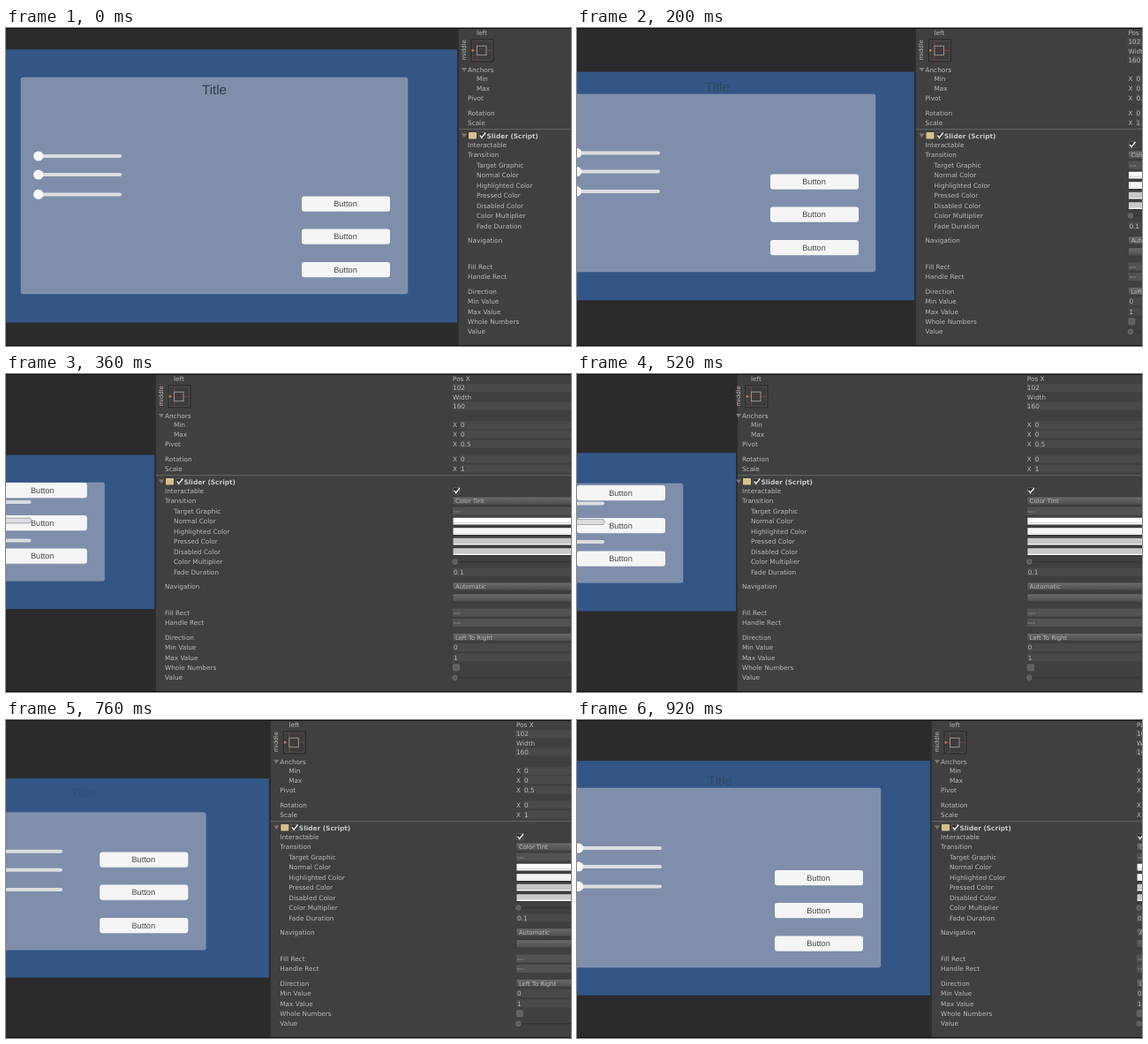
Recreate the animation shown at these times as an HTML page. Size 640 by 360 pixels, loop 0.96 s.

```html
<!DOCTYPE html>
<html lang="en">
<head>
<meta charset="utf-8">
<title>Resizing a layout</title>
<style>
  html, body { margin: 0; width: 100%; height: 100%; overflow: hidden; background: #2b2b2b; }
  svg { display: block; width: 640px; height: 360px; }
  text { text-rendering: geometricPrecision; }
  .ui { font: 7.3px "DejaVu Sans", sans-serif; fill: #b8b8b8; }
  .head { font: bold 7.4px "DejaVu Sans", sans-serif; fill: #c8c8c8; }
  .btn { font: 9.2px "Liberation Sans", Arial, sans-serif; fill: #484848; text-anchor: middle; }
  .title { font: 15px "Liberation Sans", Arial, sans-serif; fill: #333a46; text-anchor: middle; }
</style>
</head>
<body>
<svg id="stage" viewBox="0 0 640 360">
  <defs>
    <linearGradient id="bevel" x2="0" y2="1">
      <stop offset="0" stop-color="#6c6c6c"/>
      <stop offset="1" stop-color="#4c4c4c"/>
    </linearGradient>
  </defs>
</svg>
<script>
const stage = document.getElementById('stage');
const LOOP = 960, STEP = 40;

function add(parent, tag, attrs, text) {
  const el = document.createElementNS('http://www.w3.org/2000/svg', tag);
  set(el, attrs);
  if (text) el.textContent = text;
  parent.appendChild(el);
  return el;
}
function set(el, attrs) {
  for (const k in attrs) el.setAttribute(k, attrs[k]);
}
const move = (el, x, y) => el.setAttribute('transform', `translate(${x} ${y})`);
const rect = (p, x, y, width, height, fill, more) =>
  add(p, 'rect', { x, y, width, height, fill, ...more });
const label = (p, x, y, text, cls = 'ui', more) =>
  add(p, 'text', { x, y: y + 2.6, class: cls, ...more }, text);

// Poses over time, joined by monotone curves
const times = [0, 200, 360, 520, 680, 840, 920];
const poses = {
  edge:    [511, 382, 168, 180, 245, 355, 400],
  labels:  [523, 394.5, 180, 187, 257, 367, 412],
  right:   [455, 338, 111.5, 120, 184, 277, 344],
  top:     [56, 75, 123, 124, 110, 98, 77],
  bottom:  [301, 276, 234.3, 236.3, 250, 271, 280],
  slideX:  [131, 94, 28.5, 31, 48, 82, 96],
  slideY:  [166, 162.5, 166, 167.5, 167.3, 172, 166],
  btnX:    [335, 219, -8.3, 0, 64, 157, 224],
  btnY:    [236, 211, 168.6, 171.5, 184.5, 206.5, 215.5],
  titleX:  [236, 159, 25, 30, 60, 122, 162],
  titleY:  [70, 67, 85, 85, 88, 75, 69],
  titleOn: [1, 0.55, 0, 0, 0, 0.5, 0.5]
};

function curve(v) {
  const n = v.length - 1;
  const d = i => (v[i + 1] - v[i]) / (times[i + 1] - times[i]);
  const slope = v.map((_, i) => {
    if (i === 0) return 0;
    if (i === n) return d(n - 1);
    const a = d(i - 1), b = d(i);
    return a * b > 0 ? 2 * a * b / (a + b) : 0;
  });
  return t => {
    let i = 0;
    while (i < n - 1 && t >= times[i + 1]) i++;
    const h = times[i + 1] - times[i], u = Math.min(1, (t - times[i]) / h), w = 1 - u;
    return v[i] * w * w * (1 + 2 * u) + v[i + 1] * u * u * (1 + 2 * w)
      + h * u * w * (slope[i] * w - slope[i + 1] * u);
  };
}
const at = {};
for (const k in poses) at[k] = curve(poses[k]);

// Scene view
rect(stage, 0, 0, 640, 360, '#2b2b2b');
const blue = rect(stage, -2, 0, 0, 0, '#335686');
const card = rect(stage, 0, 0, 0, 0, '#7f8fab', { rx: 2, stroke: '#8896b0', 'stroke-width': 0.5 });
const title = add(stage, 'text', { class: 'title' }, 'Title');

const buttons = add(stage, 'g', {});
for (const y of [-37, 0, 37.5]) {
  rect(buttons, 0, y - 8.1, 100, 17.2, '#b4bbc8', { rx: 3 });
  rect(buttons, 0, y - 8.6, 100, 17, '#f5f5f6', { rx: 3 });
  add(buttons, 'text', { x: 49.5, y: y + 3.2, class: 'btn' }, 'Button');
}

const sliders = add(stage, 'g', {});
const bars = [-21, 0, 22.4].map(y => {
  const bar = rect(sliders, -94, y - 2, 94, 4, '#dcdde0', { rx: 2 });
  add(sliders, 'circle', { cx: -94.3, cy: y, r: 5.6, fill: '#f8f8f8' });
  return bar;
});

// Inspector
const panel = rect(stage, 0, 0, 640, 360, '#404040');
const rule = rect(stage, 0, 114.2, 640, 1, '#666');
const gap = rect(stage, 0, 0, 2, 360, '#2e2e2e');
const names = add(stage, 'g', {});
const values = add(stage, 'g', {});

function arrow(y) {
  add(names, 'path', { d: `M-7 ${y - 2}h6l-3 4.5z`, fill: '#787878' });
}
function check(p, x, y, on) {
  rect(p, x, y - 3.5, 7, 7, on ? '#303030' : '#606060', { rx: 1, stroke: '#777', 'stroke-width': 0.6 });
  if (on) add(p, 'path', {
    d: `M${x + 1.2} ${y - 0.3}l2 2.6 4.4-5.6`, fill: 'none', stroke: '#f0f0f0', 'stroke-width': 1.4
  });
}

label(names, 16, 5, 'left', 'ui', { 'text-anchor': 'middle' });
add(names, 'text', {
  class: 'ui', 'text-anchor': 'middle', transform: 'translate(-2.4 25) rotate(-90)', style: 'font-size:6.8px'
}, 'middle');
rect(names, 4, 13, 25, 25, '#3c3c3c', { stroke: '#2a2a2a' });
rect(names, 5.5, 14.5, 22, 22, 'none', { stroke: '#525252', 'stroke-width': 0.7 });
add(names, 'path', { d: 'M5 25.5H28M10.5 14V37', stroke: '#80453c', 'stroke-width': 0.8 });
rect(names, 10.5, 20.3, 10.5, 10.4, '#3c3c3c', { stroke: '#a8978f', 'stroke-width': 0.9 });
rect(names, 4.5, 24.2, 2.4, 2.4, '#c87a48');

arrow(47);
arrow(121.5);
rect(names, 1, 118, 9, 7.4, '#d6c08c', { rx: 1 });
check(names, 12.6, 121.8, true);
label(names, 21.5, 122, 'Slider (Script)', 'head');

const rows = [
  [0, 47.3, 'Anchors'], [10, 57.6, 'Min'], [10, 68, 'Max'], [0, 79.3, 'Pivot'],
  [0, 96, 'Rotation'], [0, 107.3, 'Scale'],
  [0, 132.2, 'Interactable'], [0, 143.7, 'Transition'], [10, 155.2, 'Target Graphic'],
  [10, 166.7, 'Normal Color'], [10, 178.2, 'Highlighted Color'], [10, 189.7, 'Pressed Color'],
  [10, 201.2, 'Disabled Color'], [10, 212.5, 'Color Multiplier'], [10, 224, 'Fade Duration'],
  [0, 240.5, 'Navigation'], [0, 270, 'Fill Rect'], [0, 281.5, 'Handle Rect'],
  [0, 298, 'Direction'], [0, 309.5, 'Min Value'], [0, 321, 'Max Value'],
  [0, 332.3, 'Whole Numbers'], [0, 343.8, 'Value']
];
for (const [x, y, s] of rows) label(names, x, y, s);

function field(y, text, x = 0, fill = '#494949') {
  rect(values, x, y - 4.5, 160, 9, fill);
  label(values, x + 1, y, text);
}
function menu(y, text) {
  rect(values, 0, y - 4.6, 160, 9.2, 'url(#bevel)', { rx: 1.5, stroke: '#343434', 'stroke-width': 0.6 });
  if (text) label(values, 3, y, text, 'ui', { style: 'font-size:6.8px' });
}
// Colour above, opacity strip below
function swatch(y, fill) {
  rect(values, 0, y - 4.6, 160, 9.2, '#2e2e2e');
  rect(values, 0.5, y - 4, 160, 6, fill);
  rect(values, 0.5, y + 2, 160, 1.8, '#fff');
}
function knob(y) {
  rect(values, 0, y - 0.7, 160, 1.4, '#353535');
  add(values, 'circle', { cx: 2.5, cy: y, r: 2.8, fill: '#5c5c5c', stroke: '#7c7c7c', 'stroke-width': 0.6 });
}

label(values, 0, 5.5, 'Pos X');
field(15.7, '102', -1);
label(values, 0, 26, 'Width');
field(36, '160', -1);
for (const [y, s] of [[57.6, '0'], [68, '0'], [79.3, '0.5'], [96, '0'], [107.3, '1']]) {
  label(values, 0, y, 'X');
  field(y, s, 8);
}
check(values, 0.5, 132.2, true);
menu(143.7, 'Color Tint');
for (const y of [155.2, 270, 281.5]) field(y, '---', 0, '#525252');
swatch(166.7, '#ffffff');
swatch(178.2, '#f5f5f5');
swatch(189.7, '#c8c8c8');
swatch(201.2, '#c8c8c8');
knob(212.5);
field(224, '0.1');
menu(240.5, 'Automatic');
menu(253.5);
menu(298, 'Left To Right');
field(309.5, '0');
field(321, '1');
check(values, 0.5, 332.3, false);
knob(343.8);

rect(stage, 0, 0, 640, 1, '#111');
rect(stage, 0, 359, 640, 1, '#111');

function draw(ms) {
  let t = Math.floor((ms % LOOP) / STEP) * STEP;
  if (t === 400) t = 360; // short rest at the narrowest pose
  const p = {};
  for (const k in at) p[k] = at[k](t);

  const half = 87.2 + (p.edge - 168) * 0.1965;
  set(blue, { y: 178.9 - half, width: p.edge + 2, height: half * 2 });
  const left = 17 - (511 - p.edge) * 0.29;
  set(card, { x: left, y: p.top, width: p.right - left, height: p.bottom - p.top });
  set(title, { x: p.titleX, y: p.titleY + 5.3, opacity: p.titleOn });
  move(buttons, p.btnX, p.btnY);
  move(sliders, p.slideX, p.slideY);

  // The middle bar gets an outline where it crosses a button
  const over = p.btnX < p.slideX;
  set(bars[1], {
    y: over ? -2.9 : -2, height: over ? 5.8 : 4,
    stroke: over ? '#a4a6aa' : 'none'
  });

  panel.setAttribute('x', p.edge + 2);
  rule.setAttribute('x', p.edge + 2);
  gap.setAttribute('x', p.edge);
  move(names, p.labels, 0);
  move(values, 506 + (p.labels - 180) * 0.552, 0);
}

let start;
function tick(now) {
  if (start === undefined) start = now;
  draw(now - start);
  requestAnimationFrame(tick);
}
draw(0);
requestAnimationFrame(tick);
</script>
</body>
</html>
```
